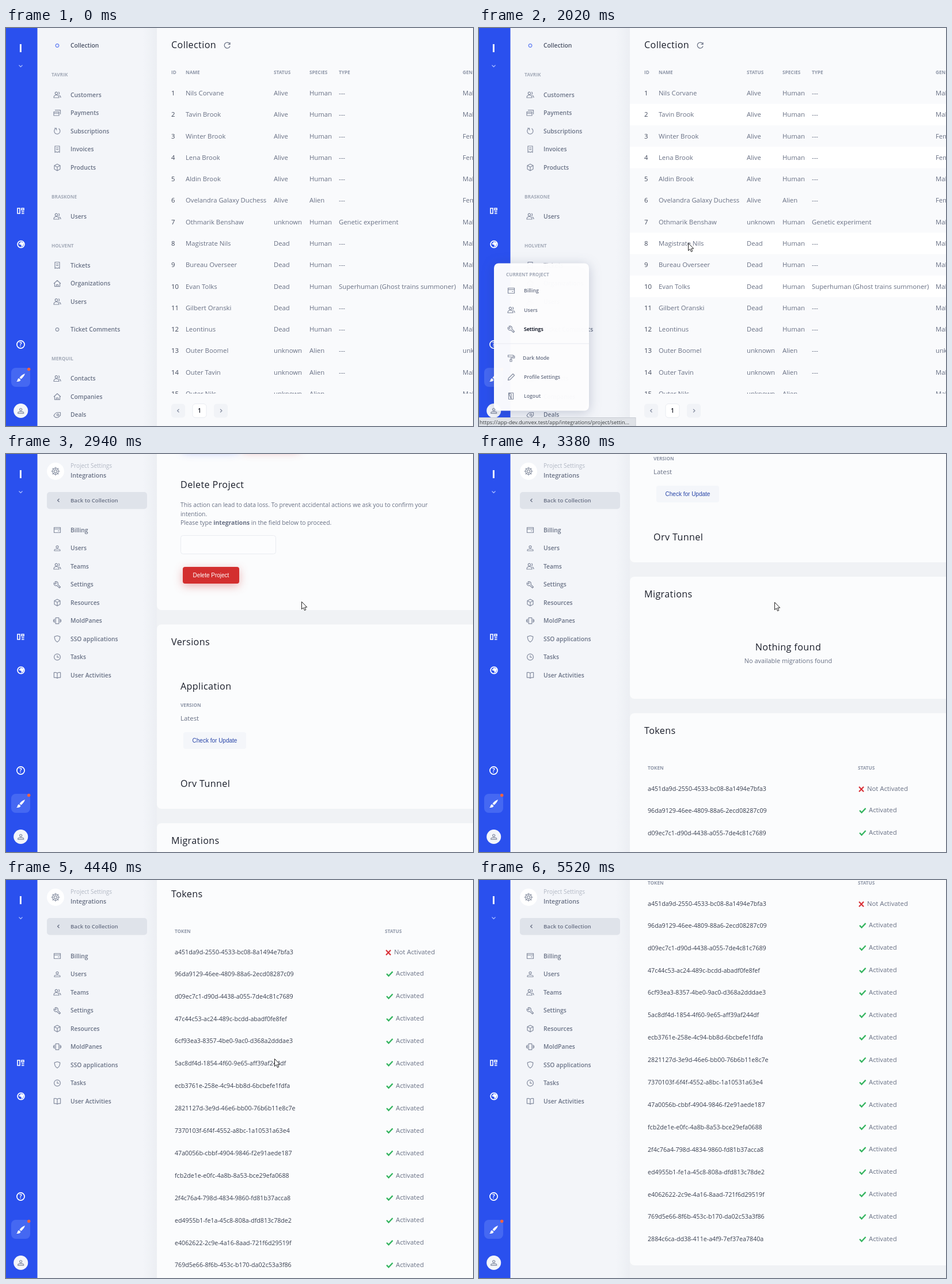
Write an HTML page that moves like this. It is 811 by 691 pixels and loops after 5.54 s.

```html
<!DOCTYPE html>
<html lang="en">
<head>
<meta charset="utf-8">
<title>Admin panel</title>
<style>
  html, body { margin: 0; width: 100%; height: 100%; overflow: hidden; background: #f9fafc; }
  svg { display: block; font-family: "Open Sans", "Noto Sans", sans-serif; }
  .button { font-family: "Liberation Sans", Arial, sans-serif; }
  text { white-space: pre; }
</style>
</head>
<body>
<svg id="stage" width="811" height="691" viewBox="0 0 811 691"></svg>
<script>
const LOOP = 5540, STEP = 20;
const BLUE = '#2a50ee', RED = '#d32f2f', GREY = '#687084', PALE = '#a3aab8', INK = '#1a1e2a', EDGE = '#e9ecf1';

// ---- drawing helpers; text is placed by the middle of its capitals ----
const text = (x, y, s, size, fill, weight = 400, more = '') =>
  `<text x="${x}" y="${(y + size * 0.36).toFixed(2)}" font-size="${size}" fill="${fill}" font-weight="${weight}" ${more}>${s}</text>`;
const title = (x, y, s, more = '') => text(x, y, s, 16.1, INK, 400, `letter-spacing=".4" ${more}`);
const label = (x, y, s, fill = '#8f97a8') => text(x, y, s, 8.2, fill, 700);
const cell = (x, y, s, fill = GREY) => text(x, y, s, 11.3, fill);
const rect = (x, y, w, h, r, fill, more = '') =>
  `<rect x="${x}" y="${y}" width="${w}" height="${h}" rx="${r}" fill="${fill}" ${more}/>`;
const line = (d, stroke, width = 1.2, more = '') =>
  `<path d="${d}" fill="none" stroke="${stroke}" stroke-width="${width}" ${more}/>`;
const ring = (x, y, r) => `M${x - r} ${y}a${r} ${r} 0 1 0 ${2 * r} 0a${r} ${r} 0 1 0 ${-2 * r} 0z`;
const group = (id, body, more = '') => `<g id="${id}" ${more}>${body}</g>`;

const ICONS = {
  dot: ring(0, 0, 2.8),
  user: ring(0, -2.2, 2) + 'M-5 4.5v-1q0-2 5-2t5 2v1z',
  users: ring(-1.5, -2.6, 2.2) + 'M-6 5q0-4.5 4.5-4.5T3 5zM2-4.8a2.2 2.2 0 0 1 0 4.3M3.5 1q2.5.8 2.5 4',
  card: 'M-5.5-4.5h11v9h-11zM-5.5-1.8h11M1 1.5h2.5',
  cards: 'M-6-2h9v6.5h-9zM-4-4.8h9.5v7M-6 .3h9',
  cycle: 'M-1.5-5a5.1 5.1 0 1 0 4 .6M-5-5h3.6v3.6',
  receipt: 'M-4-5.5h8v11l-2-1.2-2 1.2-2-1.2-2 1.2zM-2-2.5h4M-2 .3h4',
  box: 'M0-5.8l5 2.6v6.2L0 5.8-5 3v-6.2zM-5-3.2L0-.5l5-2.7M0-.5v6.3',
  home: 'M-6 .3L0-5.2 6 .3M-4.5-1v6.2h9v-6.2M-1.5 5V2h3v3',
  tag: 'M-6 1.5q3-5.5 6.5-5.5H5.5v5L1.5 4.5q-5 1.5-7.5-3z' + ring(1, 0, 1.7),
  wrench: 'M5.5 4.5L1-.2a3.5 3.5 0 0 0-5-4.4l2.3 2.2-1.4 1.8-2.5-2.2A3.5 3.5 0 0 0-.8 1.7L3.8 6z',
  panes: 'M-2.8-5.2h5.6v10.4h-5.6zM-5-3.5v7M5-3.5v7M-6.5-2v4M6.5-2v4',
  shield: 'M0-5.5l4.8 1.6q0 7-4.8 9.4-4.8-2.4-4.8-9.4z',
  clock: ring(0, 0, 5.4) + 'M0-3v3.4h3',
  book: 'M0-3.3v8.3M0-3.3q-1-1.4-2.4-1.4h-3.2v8.8h3.4L0 5.2l2.2-1.1h3.4v-8.8H2.4Q1-4.7 0-3.3',
  roller: 'M-5.5-5h9v3h-9zM3.5-3.5h2.2v3.4h-6.2v2.6M-2 2.5h3v3.5h-3z',
  pencil: 'M-5.5 5.5l.8-3.5L3-5.5 5.5-3-2 4.6z',
  door: 'M-4.5-5.5h8v11h-8zM-4.5-5.5l4.5 2v9z',
  left: 'M1.5-2.8L-1.5 0l3 2.8',
  right: 'M-1.5-2.8l3 2.8-3 2.8',
  down: 'M-3-1.5L0 1.5l3-3',
};
const icon = (name, x, y, stroke = '#858da0', width = 1.2) =>
  line(ICONS[name], stroke, width, `transform="translate(${x} ${y})" stroke-linejoin="round"`);

const menuItem = (name, y, s, fill = '#697286') => icon(name, 89, y) + text(112, y, s, 10.3, fill, 600);
const menu = (y0, items) => items.map(([name, s], i) => menuItem(name, y0 + 31.5 * i, s)).join('');

// ---- left rail ----
function rail() {
  const panels = 'M-5.5-4.500h4v9h-4zM1.500-4.500h4v3h-4zM1.500 1.500h4.500M1.500 4.500h4.500';
  return rect(0, 0, 54.5, 691, 0, BLUE) +
    text(25.5, 35, 'I', 19, '#fff', 700, 'text-anchor="middle"') +
    icon('down', 25.5, 66, '#a9bbff') +
    line(panels, '#fff', 1.6, 'transform="translate(25.500 317.500)"') +
    line(ring(26, 375.5, 5.9), '#fff', 1.8) +
    '<path d="M26 371l5 2-1 5-4 2 1-3-5-2z" fill="#fff"/>' +
    line(ring(25.5, 549.5, 6.6), '#fff', 1.7) +
    text(25.5, 549.5, '?', 10, '#fff', 700, 'text-anchor="middle"') +
    rect(9, 590, 33, 33, 8, '#4568f2') +
    '<path d="M33 600q-6 2-9.500 7l2.500 2.500q5-3.500 7-9.500zM22.500 608l3 3q-1 3.500-7.500 3 2-1 2-3t2.500-3z" fill="#fff"/>' +
    '<circle cx="39.700" cy="592.500" r="2.700" fill="#f4623f"/>' +
    '<circle cx="25.700" cy="664.500" r="12.500" fill="#f3f5fa"/>' + icon('user', 25.7, 664.5, '#8d95a8', 1.3);
}

// ---- collection page ----
const PEOPLE = ['Nils Corvane', 'Tavin Brook', 'Winter Brook', 'Lena Brook', 'Aldin Brook',
  'Ovelandra Galaxy Duchess', 'Othmarik Benshaw', 'Magistrate Nils', 'Bureau Overseer', 'Evan Tolks',
  'Gilbert Oranski', 'Leontinus', 'Outer Boomel', 'Outer Tavin', 'Outer Nils'];
const TYPES = { 6: 'Genetic experiment', 9: 'Superhuman (Ghost trains summoner)' };
const rowY = i => 113 + 37.27 * i;

function collection() {
  const sidebar = icon('dot', 89, 30.5, '#5b79f3') + text(112, 30.5, 'Collection', 10.3, '#4a5265', 600) +
    label(79, 81, 'TAVRIK', PALE) +
    menu(116, [['users', 'Customers'], ['cards', 'Payments'], ['cycle', 'Subscriptions'], ['receipt', 'Invoices'], ['box', 'Products']]) +
    label(79, 293, 'BRASKONE', PALE) + menuItem('users', 327, 'Users') +
    label(79, 378, 'HOLVENT', PALE) +
    menu(412, [['receipt', 'Tickets'], ['home', 'Organizations'], ['users', 'Users']]) +
    menuItem('dot', 523.5, 'Ticket Comments') +
    label(79, 574, 'MERQUIL', PALE) +
    menu(608.5, [['users', 'Contacts'], ['home', 'Companies'], ['tag', 'Deals']]);

  const heads = [[287, 'ID'], [312, 'NAME'], [465, 'STATUS'], [527, 'SPECIES'], [578, 'TYPE'], [793, 'GENDER']];
  const rows = PEOPLE.map((name, i) => {
    const y = rowY(i), status = i < 6 ? 'Alive' : i === 6 || i > 11 ? 'unknown' : 'Dead';
    const gender = i === 12 ? 'unknown' : [2, 3, 5].includes(i) ? 'Female' : 'Male';
    return rect(262, y - 18.6, 549, 37.3, 0, '#fff', 'class="row" opacity="0"') +
      cell(287, y, i + 1, '#3f475a') + cell(312, y, name) + cell(465, y, status) +
      cell(527, y, i === 5 || i > 11 ? 'Alien' : 'Human') + cell(578, y, TYPES[i] || '---') + cell(793, y, gender);
  }).join('');
  const pageBox = x => rect(x, 652.5, 24, 24, 5, '#f1f3f7');

  return sidebar + rect(262, 0, 549, 691, 0, '#f9fafc') +
    title(287, 29.5, 'Collection') +
    line('M388.500 27.500a5 5 0 1 0 .5 4M389 25v3.500h-3.500', GREY) +
    heads.map(([x, s]) => label(x, 77, s)).join('') +
    `<g clip-path="url(#tableClip)">${rows}</g>` +
    pageBox(287) + pageBox(361) + icon('left', 299, 664.5) + icon('right', 373.5, 664.5) +
    rect(324, 652.5, 24, 24, 5, '#fff', `stroke="${EDGE}"`) +
    text(336, 664.5, '1', 10.5, INK, 600, 'text-anchor="middle"');
}

// ---- settings page ----
const TOKENS = ['a451da9d-2550-4533-bc08-8a1494e7bfa3', '96da9129-46ee-4809-88a6-2ecd08287c09',
  'd09ec7c1-d90d-4438-a055-7de4c81c7689', '47c44c53-ac24-489c-bcdd-abadf0fe8fef',
  '6cf93ea3-8357-4be0-9ac0-d368a2dddae3', '5ac8df4d-1854-4f60-9e65-aff39af244df',
  'ecb3761e-258e-4c94-bb8d-6bcbefe1fdfa', '2821127d-3e9d-46e6-bb00-76b6b11e8c7e',
  '7370103f-6f4f-4552-a8bc-1a10531a63e4', '47a0056b-cbbf-4904-9846-f2e91aede187',
  'fcb2de1e-e0fc-4a8b-8a53-bce29efa0688', '2f4c76a4-798d-4834-9860-fd81b37acca8',
  'ed4955b1-fe1a-45c8-808a-dfd813c78de2', 'e4062622-2c9e-4a16-8aad-721f6d29519f',
  '769d5e66-8f6b-453c-b170-da02c53a3f86', '2884c6ca-dd38-411e-a4f9-7ef37ea7840a'];

const card = (top, bottom, heading) =>
  rect(262, top, 620, bottom - top, 8, '#fbfcfd') + title(287, top + 30.5, heading);
const field = (y, w) => rect(303.5, y + 0.5, w, 32, 4, '#fcfdfe', `stroke="${EDGE}"`);
const button = (x, y, w, s, fill, ink, more = '') =>
  rect(x, y, w, 29, 4, fill, more) +
  text(x + w / 2, y + 14, s, 10, ink, 400, 'class="button" text-anchor="middle"');
const glow = color => `style="filter:drop-shadow(0 4px 8px ${color}60)"`;
const note = (y, s) => text(303, y, s, 10.3, GREY, 500);

function tokenRow(token, i) {
  const y = 1557 + 38.9 * i + (i ? 0 : 0.7);
  const status = i
    ? line(`M661 ${y}l3.500 3.700 7-7.500`, '#34b45f', 2.3) + cell(677, y - 0.5, 'Activated')
    : line(`M660 ${y - 3}l8 8.500m0-8.500l-8 8.500`, '#d92f36', 2.1) + cell(674, y, 'Not Activated');
  return text(293, y, token, 10.65, '#383f50') + status;
}

function settingsCards() {
  return card(-408, 12, 'Project Settings') +
    label(303, -312, 'PROJECT NAME') + field(-297, 165) + text(316, -281, 'Integrations', 10.9, GREY) +
    label(303, -246, 'DOMAIN') + field(-231, 165) + text(316, -215, 'integrations', 10.9, GREY) +
    button(287, -33, 49, 'Save', '#f7f8fc', '#99a5e8') +

    card(38, 353, 'Additional Settings') +
    label(303, 133, 'VERSION') + field(149, 165) + text(316, 165, 'Latest', 11.4, GREY) + icon('down', 452, 166.5, GREY) +
    label(303, 200, 'SIGN UP LINK') + field(215, 147) +
    rect(306.5, 264.5, 13, 13, 3, '#fff', 'stroke="#c5cad5"') + label(329, 270.5, 'SELF SIGN UP', GREY) +
    button(286, 308, 49, 'Save', '#f9fafd', '#99a5e8') +

    card(379, 820, 'Dangerous Settings') + title(303, 485, 'Interface Settings') +
    button(307, 512, 96, 'Copy Settings', BLUE, '#fff', glow(BLUE)) +
    button(411, 512, 98, 'Reset Settings', RED, '#fff', glow(RED)) +
    title(303, 602, 'Delete Project') +
    note(637, 'This action can lead to data loss. To prevent accidental actions we ask you to confirm your') +
    note(653, 'intention.') +
    note(668, 'Please type <tspan font-weight="700">integrations</tspan> in the field below to proceed.') +
    field(690, 165) + button(307, 745, 98, 'Delete Project', RED, '#fff', glow(RED)) +

    card(845, 1165, 'Versions') + title(303, 952, 'Application') +
    label(303, 985.5, 'VERSION') + text(303, 1008, 'Latest', 11.4, GREY) +
    button(308, 1032, 109, 'Check for Update', '#f4f6fa', '#2845a8') + title(303, 1121.5, 'Orv Tunnel') +

    card(1190, 1402, 'Migrations') +
    title(537, 1312.5, 'Nothing found', 'text-anchor="middle"') +
    text(537, 1336.5, 'No available migrations found', 10.9, GREY, 400, 'text-anchor="middle"') +

    card(1427, 2186, 'Tokens') + label(293, 1522, 'TOKEN') + label(658, 1522, 'STATUS') +
    TOKENS.map(tokenRow).join('');
}

function settings() {
  const teeth = Array.from({ length: 8 }, (_, i) => {
    const a = i * Math.PI / 4, p = r => `${(r * Math.cos(a)).toFixed(2)} ${(r * Math.sin(a)).toFixed(2)}`;
    return `M${p(2.2)}L${p(7.6)}`;
  }).join('');
  return '<circle cx="86" cy="30" r="15" fill="#fff"/>' +
    line(ring(0, 0, 5.6) + ring(0, 0, 2.2) + teeth, '#8d95a6', 1.1, 'transform="translate(86 30)"') +
    text(112, 20.5, 'Project Settings', 10, '#b2b8c4') + text(112, 37.5, 'Integrations', 10.6, GREY, 600) +
    rect(71, 66, 174, 29.5, 5, '#dfe3ea') + icon('left', 91, 80.5, GREY) + text(112, 80.5, 'Back to Collection', 9.6, GREY, 600) +
    menu(132, [['card', 'Billing'], ['user', 'Users'], ['users', 'Teams'], ['wrench', 'Settings'], ['box', 'Resources'],
      ['panes', 'MoldPanes'], ['shield', 'SSO applications'], ['clock', 'Tasks'], ['book', 'User Activities']]) +
    rect(262, 0, 549, 691, 0, '#f0f2f5') + group('scroller', settingsCards());
}

// ---- overlays ----
function popup() {
  const item = (name, y, s, x = 78) => icon(name, 56, y) + text(x, y, s, 8.7, GREY, 600);
  return rect(26, 408.5, 165, 256, 8, '#fdfdfe', 'fill-opacity=".975" style="filter:drop-shadow(0 3px 10px #2a3a6640)"') +
    label(47, 428, 'CURRENT PROJECT', PALE) +
    item('card', 456, 'Billing') + item('users', 489.5, 'Users') + item('wrench', 522.5, 'Settings') +
    group('settingsHover', text(78, 522.5, 'Settings', 8.7, INK, 600)) +
    rect(26, 547.5, 165, 1, 0, EDGE) +
    item('roller', 573, 'Dark Mode', 76) + item('pencil', 606, 'Profile Settings') + item('door', 639, 'Logout');
}

const statusBar = rect(0, 676.5, 272, 15, 0, '#dfe2e7', 'stroke="#c9cdd4"') +
  text(1, 685, 'https://app-dev.dunvex.test/app/integrations/project/settin...', 9.2, '#3c4043');
const arrow = '<path d="M.5.500v13l3-2.700 2 4.700 2.200-1-2-4.500h4z" fill="#fff" stroke="#222" stroke-width="1"/>';
const hand = '<path d="M2 1q1.500-1 2 .5v5l5.500 1.500q1.500.5 1 2.500l-1 4.500H4L0 9.500q-.5-1.500 2-.5z" fill="#fff" stroke="#222" stroke-width="1"/>';

document.getElementById('stage').innerHTML =
  `<defs><clipPath id="tableClip"><path d="M262 90h549v545h-549z"/></clipPath>
   <linearGradient id="shade"><stop stop-color="#f3f5f9"/><stop offset="1" stop-color="#e9ecf1"/></linearGradient></defs>` +
  rect(54, 0, 208, 691, 0, '#f3f5f9') + rect(238, 0, 32, 691, 0, 'url(#shade)') +
  group('collection', collection()) + group('settings', settings()) + rail() +
  group('popup', popup()) + group('statusBar', statusBar) +
  group('cursor', group('arrow', arrow) + group('hand', hand));

// ---- motion ----
const POINTER = [[100, 805, 45], [260, 805, 45], [420, 610, 215], [620, 260, 480], [800, 21, 662],
  [1000, 24, 655], [1360, 106, 530], [1700, 110, 517], [1900, 110, 517], [1940, 180, 505], [1970, 265, 453],
  [2020, 363, 373], [2200, 513, 254], [2640, 513, 254], [3240, 513, 257], [3740, 513, 257], [3860, 513, 260],
  [4300, 513, 260], [4660, 391, 389], [4860, 391, 389], [4960, 398, 382], [5100, 398, 382],
  [5300, 585, 257], [5500, 809, 55]];
const SCROLL = [[2360, -433], [2640, 0], [2900, 500], [2920, 520], [3240, 977], [3380, 977], [3560, 1200],
  [3740, 1200], [3860, 1353], [4280, 1410], [4660, 1464], [4860, 1464], [4960, 1517]];
const ROWS_LEFT_LIT = [[1, 330], [3, 440], [9, 1960]];
const PAGE_SWITCH = 2100;

function track(keys, t) {
  if (t <= keys[0][0]) return keys[0].slice(1);
  const i = keys.findIndex(k => k[0] > t);
  if (i < 0) return keys[keys.length - 1].slice(1);
  const a = keys[i - 1], b = keys[i], p = (t - a[0]) / (b[0] - a[0]);
  return a.slice(1).map((v, j) => v + (b[j + 1] - v) * p);
}

const el = id => document.getElementById(id);
const show = (id, on) => el(id).setAttribute('display', on ? 'inline' : 'none');
const ramp = (t, from, to) => Math.min(1, Math.max(0, (t - from) / (to - from)));
const rowBands = [...document.querySelectorAll('.row')];

function render(t) {
  const [x, y] = track(POINTER, t), [scroll] = track(SCROLL, t);
  const onCollection = t < PAGE_SWITCH;
  show('collection', onCollection);
  show('settings', !onCollection);
  el('scroller').setAttribute('transform', `translate(0 ${-Math.round(scroll)})`);

  const under = t >= 100 && x > 262 ? Math.round((y - rowY(0)) / 37.27) : -1;
  rowBands.forEach((band, i) => {
    const lit = i === under || ROWS_LEFT_LIT.some(([row, from]) => row === i && t >= from);
    band.setAttribute('opacity', lit ? 1 : 0);
  });

  const opened = ramp(t, 820, 960) * (1 - ramp(t, 2060, 2140));
  show('popup', opened > 0);
  el('popup').setAttribute('opacity', opened);
  show('settingsHover', t >= 1360);
  show('statusBar', t >= 1400 && t < 2360);

  const overLink = (t >= 760 && t < 900) || (t >= 1300 && t < 1940);
  show('cursor', t >= 100 && t < 5510);
  show('hand', overLink);
  show('arrow', !overLink);
  el('cursor').setAttribute('transform', `translate(${Math.round(x)} ${Math.round(y)})`);
}

// The screen advances in even steps, as a recording does.
const start = performance.now();
function frame() {
  const elapsed = Math.round((performance.now() - start) / STEP) * STEP;
  render(elapsed % LOOP);
  requestAnimationFrame(frame);
}
frame();
</script>
</body>
</html>
```
